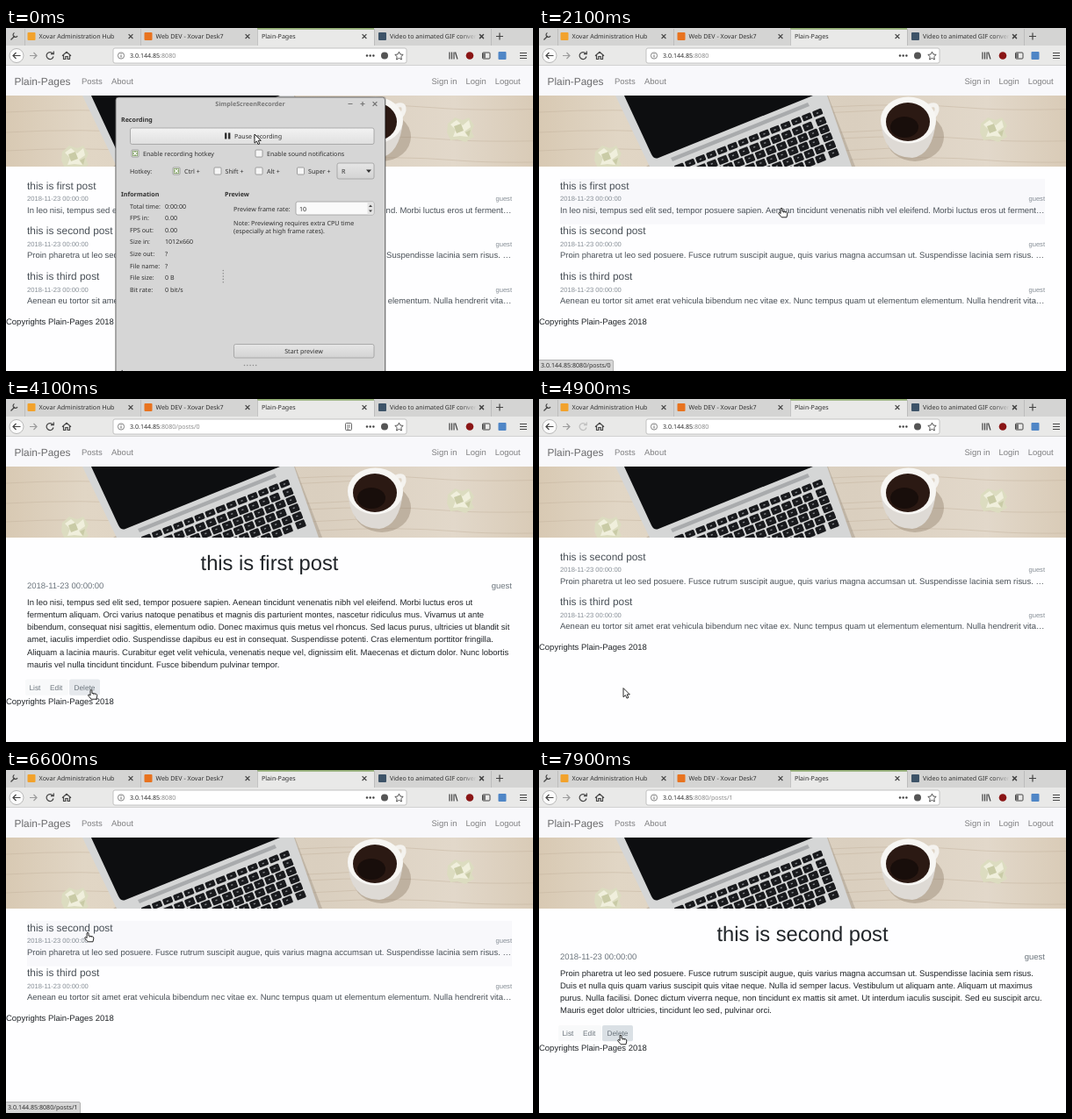
These frames come from a looping animation (600 px wide and 391 px high, 8000 ms). An HTML page:

```html
<!DOCTYPE html>
<html lang="en">
<head>
<meta charset="utf-8">
<title>Plain-Pages</title>
<style>
html, body { margin: 0; width: 100%; height: 100%; overflow: hidden; background: #fff; }
svg { display: block; width: 600px; height: 391px; }
text { font-family: "Liberation Sans", Arial, sans-serif; text-rendering: geometricPrecision; white-space: pre; }
.ui { font-family: "Noto Sans", sans-serif; font-size: 7.1px; fill: #303030; }
.b { font-weight: 700; }
.line { fill: none; stroke: #444; stroke-width: 1.2; }
</style>
</head>
<body>
<svg id="stage" viewBox="0 0 600 391"></svg>
<script>
const LOOP = 8000;
const text = (x, y, s, size, fill, extra = '') =>
  `<text x="${x}" y="${y}" font-size="${size}" fill="${fill}" ${extra}>${s}</text>`;
const ui = (x, y, s, cls = '', extra = '') => `<text class="ui ${cls}" x="${x}" y="${y}" ${extra}>${s}</text>`;
const rect = (x, y, w, h, fill, extra = '') =>
  `<rect x="${x}" y="${y}" width="${w}" height="${h}" fill="${fill}" ${extra}/>`;
const circle = (x, y, r, fill, extra = '') => `<circle cx="${x}" cy="${y}" r="${r}" fill="${fill}" ${extra}/>`;
const line = (d, extra = '') => `<path class="line" d="${d}" ${extra}/>`;
const shape = (d, fill, extra = '') => `<path d="${d}" fill="${fill}" ${extra}/>`;
const group = (id, body, extra = '') => `<g id="${id}" ${extra}>${body}</g>`;
const range = (n, fn) => Array.from({ length: n }, (_, i) => fn(i)).join('');
const END = 'text-anchor="end"', MID = 'text-anchor="middle"';

const posts = [
  { title: 'this is first post',
    brief: 'In leo nisi, tempus sed elit sed, tempor posuere sapien. Aenean tincidunt venenatis nibh vel eleifend. Morbi luctus eros ut ferment…',
    body: ['In leo nisi, tempus sed elit sed, tempor posuere sapien. Aenean tincidunt venenatis nibh vel eleifend. Morbi luctus eros ut',
      'fermentum aliquam. Orci varius natoque penatibus et magnis dis parturient montes, nascetur ridiculus mus. Vivamus ut ante',
      'bibendum, consequat nisi sagittis, elementum odio. Donec maximus quis metus vel rhoncus. Sed lacus purus, ultricies ut blandit sit',
      'amet, iaculis imperdiet odio. Suspendisse dapibus eu est in consequat. Suspendisse potenti. Cras elementum porttitor fringilla.',
      'Aliquam a lacinia mauris. Curabitur eget velit vehicula, venenatis neque vel, dignissim elit. Maecenas et dictum dolor. Nunc lobortis',
      'mauris vel nulla tincidunt tincidunt. Fusce bibendum pulvinar tempor.'] },
  { title: 'this is second post',
    brief: 'Proin pharetra ut leo sed posuere. Fusce rutrum suscipit augue, quis varius magna accumsan ut. Suspendisse lacinia sem risus. …',
    body: ['Proin pharetra ut leo sed posuere. Fusce rutrum suscipit augue, quis varius magna accumsan ut. Suspendisse lacinia sem risus.',
      'Duis et nulla quis quam varius suscipit quis vitae neque. Nulla id semper lacus. Vestibulum ut aliquam ante. Aliquam ut maximus',
      'purus. Nulla facilisi. Donec dictum viverra neque, non tincidunt ex mattis sit amet. Ut interdum iaculis suscipit. Sed eu suscipit arcu.',
      'Mauris eget dolor ultricies, tincidunt leo sed, pulvinar orci.'] },
  { title: 'this is third post',
    brief: 'Aenean eu tortor sit amet erat vehicula bibendum nec vitae ex. Nunc tempus quam ut elementum elementum. Nulla hendrerit vita…' }
];
const DATE = '2018-11-23 00:00:00', AUTHOR = 'guest', HOST = '3.0.144.85';
const TOP = 172, PITCH = 51.6;

const footer = y => text(0, y, 'Copyrights Plain-Pages 2018', 9.49, '#212529');

const listPage = ids => ids.map((id, i) => {
  const y = TOP + i * PITCH, p = posts[id];
  return text(24, y + 11.8, p.title, 11.86, '#495057') +
    text(24, y + 25.4, DATE, 7.59, '#868e96') + text(576, y + 25.4, AUTHOR, 7.59, '#868e96', END) +
    text(24, y + 38.5, p.brief, 9.49, '#495057');
}).join('') + footer(TOP + 11 + ids.length * PITCH);

const buttonTop = id => 234 + posts[id].body.length * 14.23;
const postPage = id => {
  const p = posts[id], y = buttonTop(id);
  return text(300, 195.3, p.title, 23.72, '#212529', MID) +
    text(24, 215.6, DATE, 9.49, '#6c757d') + text(576, 215.6, AUTHOR, 9.49, '#6c757d', END) +
    p.body.map((s, i) => text(24, 234.8 + i * 14.23, s, 9.49, '#212529')).join('') +
    rect(22, y, 49, 18.4, '#f8f9fa', 'rx="2"') + rect(72, y, 35, 18.4, '#f8f9fa', `rx="2" id="del${id}"`) +
    text(26.5, y + 12.2, 'List', 8.3, '#6c757d') + text(50, y + 12.2, 'Edit', 8.3, '#6c757d') +
    text(77.5, y + 12.2, 'Delete', 8.3, '#6c757d') + footer(y + 28.7);
};

const cross = (x, y, r = 2.4) => line(`M${x - r} ${y - r}l${2 * r} ${2 * r}m0 ${-2 * r}l${-2 * r} ${2 * r}`);
const tab = (x, icon, name) => rect(x + 4.5, 5, 9, 9, icon, 'rx="1"') + ui(x + 17.5, 12.4, name) + cross(x + 122, 9.6);

const chrome = () =>
  rect(0, 0, 600, 20, '#d4d4d3') + rect(0, 20, 600, 23, '#e9e9e8') +
  rect(286, 0, 133, 20, '#e9e9e8') + rect(286, 0, 133, 1.8, '#92ad75') +
  [21, 153, 286, 419, 552].map(x => rect(x, 1, .7, 19, '#b4b4b4')).join('') +
  line('M5.5 13.5L10 9', 'stroke-width="2"') + line('M9.5 5.5a2.6 2.6 0 1 0 3.5 3.5') +
  tab(20, '#f2a22c', 'Xovar Administration Hub') + tab(153, '#e8731f', 'Web DEV - Xovar Desk7') +
  ui(291, 12.4, 'Plain-Pages') + cross(408, 9.6) +
  tab(419.5, '#3d5368', 'Video to animated GIF conver') + rect(518, 3, 18, 14, 'url(#fade)') + cross(541.5, 9.6) +
  line('M558 9.5h8m-4-4v8') + rect(0, 42.4, 600, .8, '#c4c4c4') +
  circle(12, 31.5, 8, '#fbfbfb', 'stroke="#a9a9a9" stroke-width=".8"') +
  line('M16.5 31.5h-8.5m3.5-3.5l-3.5 3.5l3.5 3.5') +
  line('M27 31.5h8m-3.5-3.5l3.5 3.5l-3.5 3.5', 'style="stroke:#9c9c9c"') +
  group('reload', line('M53.2 29a4 4 0 1 0 .8 3.5m.3-6v3.2h-3.3')) +
  line('M64 31.7l5-4.5l5 4.5m-8.5-.8v4.6h2.3v-3h2.4v3h2.3v-4.6') +
  rect(122, 23, 334, 17, '#fff', 'rx="2" stroke="#b5b5b5" stroke-width=".8"') +
  circle(131, 31.5, 3.6, 'none', 'stroke="#666" stroke-width=".8"') + rect(130.5, 31, 1, 2.5, '#666') + rect(130.5, 29.2, 1, 1, '#666') +
  `<text class="ui" x="141" y="34">${HOST}<tspan id="path" fill="#8a8a8a"></tspan></text>` +
  group('reader', rect(386.5, 27.5, 7, 8, 'none', 'stroke="#555" stroke-width=".9" rx="1"') + line('M388 30h4m-4 2h4m-4 2h2.5', 'style="stroke-width:.7"')) +
  [411, 414.7, 418.4].map(x => circle(x, 31.5, 1.2, '#444')).join('') + circle(431, 31.5, 4, '#555') +
  line('M447.5 27l1.4 3 3.3.4-2.4 2.3.6 3.3-2.9-1.6-2.9 1.6.6-3.3-2.4-2.3 3.3-.4z', 'style="stroke-width:.9"') +
  line('M505 27.5v8m2.5-8v8m2.5-8v8m1.5-8l2.5 8') + circle(528, 31.5, 4.3, '#8a1515') +
  rect(542.5, 28, 8.5, 7, 'none', 'stroke="#444" rx="1"') + rect(543, 28.5, 3, 6, '#777') +
  rect(560.5, 27, 9, 9, '#4f86c6', 'rx="1"') + line('M585 28.5h8m-8 3h8m-8 3h8') +
  rect(0, 43, 600, 34, '#f8f8fb') + text(9.5, 64.6, 'Plain-Pages', 11.86, '#6b6b6d') +
  [[86, 'Posts'], [120, 'About'], [484.5, 'Sign in'], [523.5, 'Login'], [556.7, 'Logout']]
    .map(([x, s]) => text(x, 64, s, 9.49, '#808082')).join('');

const crumple = (x, y) => `<g transform="translate(${x} ${y})">` +
  shape('M-15-6L-7-13L2-10L9-13L15-4L12 3L15 9L5 15L-4 12L-12 13L-16 4Z', '#dcdcc0') +
  shape('M-12-5L-5-10L2-4L9-10L11-2L4 3L8 9L-1 8L-9 9L-6 1Z', '#f0efdc') +
  shape('M-8-3L0-6L3 2L-5 5ZM5 4L11 1L9 9Z', '#c9cba6') + '</g>';

const banner = () => `<g clip-path="url(#bannerClip)">` + rect(0, 77, 600, 81, 'url(#wood)') +
  [[0, 96], [0, 119], [0, 140], [330, 90], [340, 126], [355, 150]].map(([x, y]) =>
    line(`M${x} ${y}q90 -5 160 1t260 -5`, 'style="stroke:#c3b29c;stroke-width:.8;opacity:.6"')).join('') +
  crumple(79, 147) + crumple(518, 115) +
  shape('M122 158L360 158L329 77L240 77Z', '#8d8272', 'opacity=".35"') +
  shape('M87 77L328 77L356 158L126 158Z', '#d5d6d6') +
  shape('M97 77L312 77L136 148Q131 150 128 144Z', '#0d0e10') +
  shape('M150 148L306 85L308 89L152 152Z', '#a9abad') +
  `<g transform="translate(322 91) rotate(-21.5)">` + range(6, j => range(15, i =>
    rect(-13 * i - 12 - (i ? j % 2 * 3 : 0), j * 9.8, 11, j ? 8.4 : 7, '#191a1d', 'rx="1.3"') +
    rect(-13 * i - 8 - (i ? j % 2 * 3 : 0), j * 9.8 + 3, 2.2, 1.4, '#85888c'))) + '</g>' +
  `<ellipse cx="428" cy="124" rx="33" ry="28" fill="#8c7b68" opacity=".4"/>` +
  line('M444 89q10-4 9 5q-2 7-8 9', 'style="stroke:#f4f2ee;stroke-width:5"') +
  shape('M389 103Q391 148 425 148Q448 145 452 106Z', '#dedad5') +
  `<ellipse cx="420.5" cy="105" rx="31.5" ry="26.5" fill="#f7f6f3"/><ellipse cx="420" cy="107" rx="25" ry="22" fill="#2b1913"/>` +
  `<ellipse cx="416" cy="113" rx="16" ry="12" fill="#180e0b"/></g>`;

const button = (x, y, w, h, id = '') => rect(x, y, w, h, 'url(#btn)', `rx="2" stroke="#9d9d9d" stroke-width=".8" ${id}`);
const check = (x, y, on, label, tx) => rect(x - 4, y - 4, 8, 8, on ? '#eef3e8' : '#f6f6f6', 'rx="1" stroke="#8b8b8b" stroke-width=".8"') +
  (on ? rect(x - 3, y - 3, 6, 6, '#88a56d') + line(`M${x - 2} ${y - 2}l4 4m0-4l-4 4`, 'style="stroke:#fff"') : '') + ui(tx, y + 2.5, label);
const stats = [
  ['Total time:', '0:00:00', '0:00:01'], ['FPS in:', '0.00', '31.45'], ['FPS out:', '0.00', '0.00'],
  ['Size in:', '1012x660', '1012x660'], ['Size out:', '?', '1012x660'], ['File name:', '?', 'blog-20....17.mp4'],
  ['File size:', '0 B', '66 KiB'], ['Bit rate:', '0 bit/s', '0 bit/s']
];
const dialog = () => rect(124, 78, 309, 330, '#000', 'rx="4" opacity=".18"') +
  rect(125, 79, 306.5, 330, '#d6d6d6', 'rx="3" stroke="#6f6f6f" stroke-width=".9"') +
  ui(278, 89.2, 'SimpleScreenRecorder', 'b', `${MID} style="fill:#777"`) +
  line('M389.5 86.5h5M403.5 86.5h5m-2.5-2.5v5', 'style="stroke:#777"') + `<g opacity=".7">${cross(420, 86.5)}</g>` +
  ui(131, 107, 'Recording', 'b') + button(141.5, 114, 277.5, 18.5, 'id="pause"') +
  rect(249, 119.5, 2.4, 7, '#333') + rect(253, 119.5, 2.4, 7, '#333') + ui(260, 125.6, 'Pause recording') +
  check(147, 143, 1, 'Enable recording hotkey', 156) + check(288, 143, 0, 'Enable sound notifications', 297) +
  ui(141, 165.5, 'Hotkey:') + check(194, 163, 1, 'Ctrl +', 203) + check(241, 163, 0, 'Shift +', 249.5) +
  check(288, 163, 0, 'Alt +', 297) + check(335.5, 163, 0, 'Super +', 344) +
  button(377, 154, 42, 18) + ui(382, 165.6, 'R') + shape('M410 161.5h6l-3 3.5z', '#333') +
  ui(131, 191.7, 'Information', 'b') + ui(249, 191.7, 'Preview', 'b') +
  stats.map(([s], i) => ui(141, 205.5 + i * 13.65, s) + ui(181, 205.5 + i * 13.65, '', 'stat')).join('') +
  range(5, i => circle(247.3, 276.5 + i * 3.3, .8, '#8e8e8e')) +
  ui(259, 208.5, 'Preview frame rate:') + rect(330, 198, 89, 15, '#fafafa', 'rx="2" stroke="#9d9d9d" stroke-width=".8"') +
  ui(334, 208.5, '10') + rect(411.5, 198.5, 7, 14, '#e3e3e3') + shape('M413 204l2-2.5 2 2.5zM413 207.5h4l-2 2.5z', '#444') +
  ui(259, 225.4, 'Note: Previewing requires extra CPU time') + ui(259, 234.4, '(especially at high frame rates).') +
  button(259.5, 360.5, 159.5, 15.5) + ui(339, 370.8, 'Start preview', '', MID) +
  range(5, i => circle(271.5 + i * 3.3, 384.5, .8, '#8e8e8e')) + ui(131, 395, 'Log', 'b');

const gradient = (id, dir, stops) => `<linearGradient id="${id}" ${dir}>` +
  stops.map(([o, c, a = 1]) => `<stop offset="${o}" stop-color="${c}" stop-opacity="${a}"/>`).join('') + '</linearGradient>';
const DOWN = 'x1="0" y1="0" x2="0" y2="1"';

stage.innerHTML = '<defs><clipPath id="bannerClip"><rect y="77" width="600" height="81"/></clipPath>' +
  gradient('fade', '', [[0, '#d4d4d3', 0], [1, '#d4d4d3']]) +
  gradient('wood', '', [[0, '#d8c9b3'], [.15, '#e1d6c5'], [.6, '#dacfbf'], [.85, '#e2d8ca'], [1, '#d9cbb7']]) +
  gradient('btn', DOWN, [[0, '#e6e6e6'], [1, '#d3d3d3']]) + gradient('btnHot', DOWN, [[0, '#f3f3f3'], [1, '#dfdfdf']]) +
  '</defs>' + rect(0, 0, 600, 391, '#fefeff') + chrome() + banner() +
  rect(24, 0, 552, 51.6, '#f8f8fb', 'id="hover"') +
  group('list3', listPage([0, 1, 2])) + group('post0', postPage(0)) +
  group('list2', listPage([1, 2])) + group('post1', postPage(1)) + group('dialog', dialog()) +
  group('status', rect(-1, 378.5, 85.5, 14, '#d6d6d6', 'rx="1.5" stroke="#a2a2a2" stroke-width=".8"') + ui(2, 387.4, '', '', 'id="link"')) +
  group('arrow', shape('M0 0V10.2L2.4 8L4 11.6L5.8 10.8L4.2 7.3H7.3Z', '#fff', 'stroke="#111" stroke-width=".9"')) +
  group('hand', shape('M-.9.8Q0-.6 1 .8V4L5.5 4.8Q7 5.2 6.8 7L6 10.8H.2L-3.4 6.6Q-3.2 5-1.8 5.8L-.9 6.6Z', '#fff', 'stroke="#111" stroke-width=".9"') +
    line('M2.6 4.5v1.6m2-1.3v1.4', 'style="stroke-width:.6"'));

const $ = id => document.getElementById(id);
const show = (id, on) => $(id).style.display = on ? '' : 'none';

// start time, page, link ids on the page, address path
const pages = [
  [0, 'list3', [0, 1, 2], ''], [2900, 'post0', [], '/posts/0'],
  [4900, 'list2', [1, 2], ''], [6800, 'post1', [], '/posts/1']
];
const moves = [
  [0, 283, 121], [250, 283, 121], [900, 290, 352], [1050, 291, 400], [1700, 288, 400], [2050, 276, 205],
  [3100, 276, 205], [3950, 97, 331.5], [5000, 96, 329.5], [5500, 96, 329.5], [6300, 93, 185], [6950, 93, 185],
  [7650, 93, 302], [LOOP, 93, 302]
];
const pointer = t => {
  const i = moves.findIndex(m => m[0] > t), [t0, x0, y0] = moves[i - 1], [t1, x1, y1] = moves[i];
  const u = (t - t0) / (t1 - t0), e = u * u * (3 - 2 * u);
  return [x0 + (x1 - x0) * e, y0 + (y1 - y0) * e];
};

function draw(t) {
  const [start, name, links, path] = pages.filter(p => p[0] <= t).pop();
  const [x, y] = pointer(t), open = t < 1500;
  pages.forEach(p => show(p[1], p[1] === name));
  show('dialog', open);
  $('pause').setAttribute('fill', open && y < 132 ? 'url(#btnHot)' : 'url(#btn)');
  document.querySelectorAll('.stat').forEach((el, i) => el.textContent = stats[i][t < 1000 ? 1 : 2]);

  const row = Math.floor((y - TOP) / PITCH);
  const over = !open && row >= 0 && row < links.length;
  show('hover', over);
  show('status', over);
  if (over) {
    $('hover').setAttribute('y', TOP + row * PITCH);
    $('link').textContent = `${HOST}:8080/posts/${links[row]}`;
  }

  let onButton = false;
  if (path) {
    const id = +path.slice(-1), top = buttonTop(id);
    onButton = x > 72 && x < 107 && y > top && y < top + 18.4;
    const pressed = id ? t >= 7850 : t >= 4600;
    $('del' + id).setAttribute('fill', onButton ? pressed ? '#dae0e5' : '#e6e9ed' : '#f8f9fa');
  }
  $('path').textContent = ':8080' + path;
  $('path').style.fill = '#8a8a8a';
  show('reader', name === 'post0');
  $('reload').setAttribute('opacity', start && t - start < 500 ? .25 : 1);

  const hand = over || onButton;
  show('hand', hand);
  show('arrow', !hand);
  $(hand ? 'hand' : 'arrow').setAttribute('transform', `translate(${x} ${y})`);
}

function tick() {
  draw(performance.now() % LOOP);
  requestAnimationFrame(tick);
}
tick();
</script>
</body>
</html>
```
